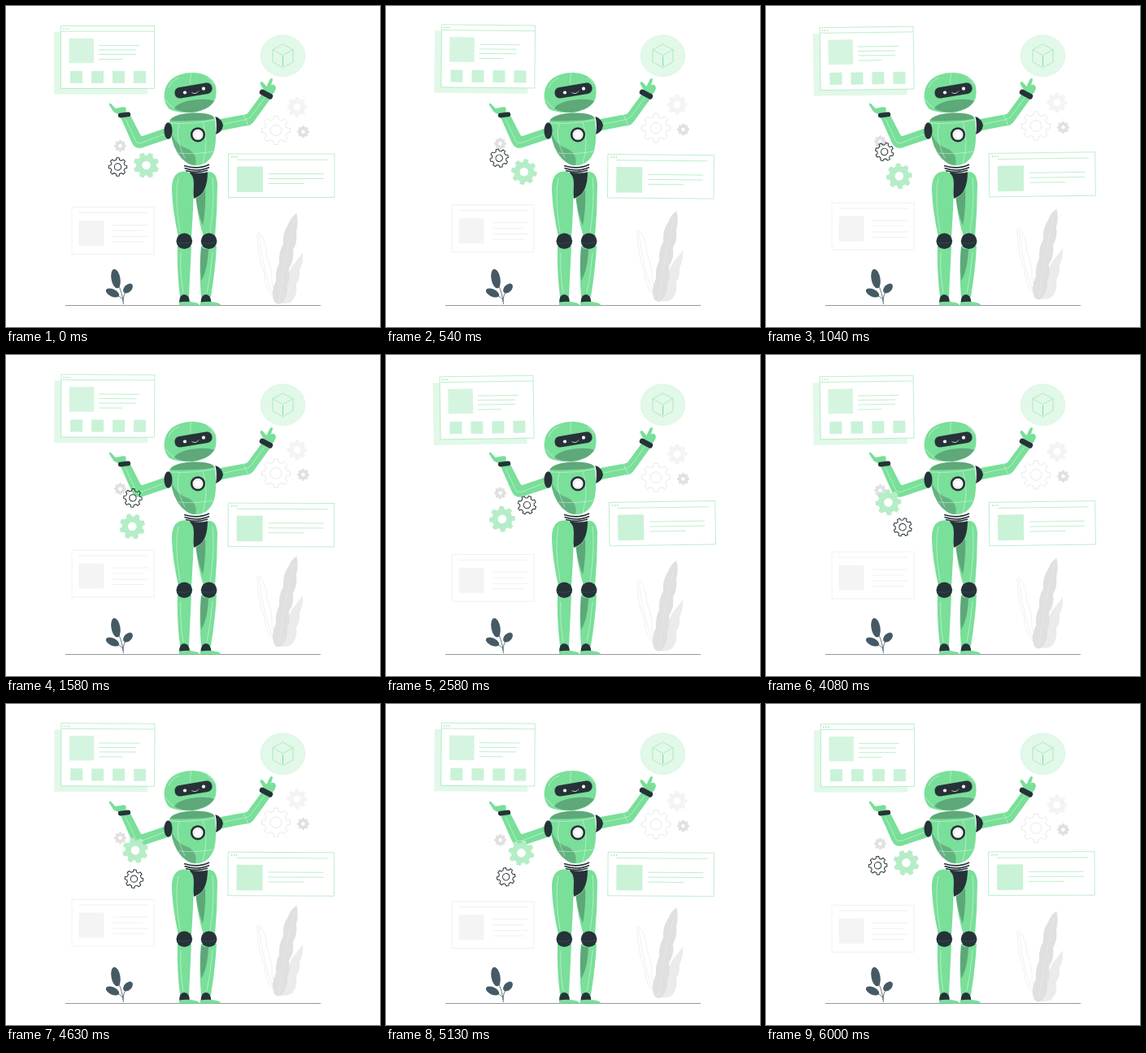
These frames come from a looping animation (460 by 395 pixels, 6040 ms). An HTML page:

```html
<!DOCTYPE html>
<html lang="en">
<head>
<meta charset="utf-8">
<title>Robot assistant</title>
<style>
html, body { margin: 0; width: 100%; height: 100%; overflow: hidden; background: #fff; }
svg { display: block; width: 460px; height: 395px; }
.g { fill: #79df99; }
.d { fill: #263238; }
.pale { fill: #c9f2d7; }
.shade { fill: #263238; opacity: .32; }
.line, .thin, .glint { fill: none; stroke-width: .5; }
.line { stroke: #79df99; }
.thin { stroke: #e0e0e0; }
.glint { stroke: #fff; stroke-width: .6; opacity: .7; }
</style>
</head>
<body>
<svg viewBox="0 0 460 395">
  <path d="M73 368.500H387" fill="none" stroke="#263238" stroke-width=".5"/>

  <g class="float">
    <path fill="#ebebeb" d="M338 366Q342 350 348 337Q347 328 352 320Q357 314 365 303.500Q366 315 361 325Q362 336 357 342Q359 355 352 363Q347 367 338 366"/>
    <path fill="#e0e0e0" d="M330 364Q325 352 332 338Q331 326 336 316Q335 303 341 293Q340 278 347 269Q350 260 357.500 255Q360 268 357 278Q359 290 353 300Q355 313 348 323Q350 335 346 344Q347 355 341 363Q336 370 330 364"/>
    <path class="thin" d="M330 359Q319 350 318 330Q310 312 309 282Q309 277 313 281Q320 290 321 308Q328 325 327 340Q331 350 330 359M311 282Q316 325 329 357"/>
    <path fill="none" stroke="#ededed" stroke-width=".5" d="M355 262Q342 310 336 364M363 309Q349 340 344 364"/>
    <path class="thin" d="M81 247.700H182V305.500H81ZM89 254.500H174M131 269.500H175M131 276.500H168M131 283.500H175M131 290H171"/>
    <path fill="#f4f4f4" d="M89.500 264h31v31h-31z"/>
  </g>

  <g fill="#455a64">
    <path fill="none" stroke="#455a64" stroke-width=".8" d="M144.500 367Q143 350 135 337M144 361Q138 355 130 353M144 364Q144 354 150 348"/>
    <ellipse cx="135" cy="335.500" rx="5.500" ry="12" transform="rotate(-10 135 335.500)"/>
    <ellipse cx="131" cy="353" rx="8.800" ry="4.600" transform="rotate(25 131 353)"/>
    <ellipse cx="150" cy="347.500" rx="7" ry="4.600" transform="rotate(-45 150 347.500)"/>
  </g>

  <g id="panels">
    <path fill="#e2f8e9" d="M59 32H174V108.500H59z"/>
    <path class="line" style="fill:#fff" d="M67.500 24.500H182.500V101.500H67.500z"/>
    <path class="line" d="M68 31.200H182M114 48.500H164M114 54H160M114 59.500H160M114 65.500H143"/>
    <path fill="#d5f5e0" d="M77.500 39.700h30.500v30.500h-30.500z"/>
    <path class="pale" d="M79 80h15v15h-15zM105 80h15v15h-15zM131 80h15v15h-15zM157 80h15v15h-15z"/>
    <path class="line" style="fill:#fff" d="M273.500 182H404V235.500H273.500z"/>
    <path class="line" d="M284 189.200H396M323 206.500H391M323 212.500H391M323 218.500H367"/>
    <path class="pale" d="M284 197.500h32v31.500h-32z"/>
    <path class="line" stroke-dasharray="1.400 1.600" style="stroke-width:1.200" d="M70.200 28H79M277.200 185.700H286"/>
  </g>

  <ellipse cx="340.500" cy="61.300" rx="27.300" ry="25.500" fill="#e2f8e9" stroke="#c9f2d7" stroke-width=".5"/>
  <path class="line" d="M340.500 47L353 53.700V68.800L340.500 75.800L328 68.800V53.700ZM328 53.700L340.500 60.800L353 53.700"/>
  <path class="line" style="stroke-width:1" d="M340.500 62V74"/>

  <g id="robot">
    <!-- arms -->
    <path class="g" d="M264 139L294 133.500Q296.500 133 298 131L315 108L326 113L305 142Q301 148 294 147.500L264 153.500z"/>
    <path class="g" d="M318.500 106L312.500 95.500Q313 91.500 316 94L320.500 99L324.500 90.500Q328 87.500 328 91L326 97.500Q331 95 332 101Q331 106 327 109z"/>
    <rect class="d" x="311.300" y="105.200" width="17.500" height="6.800" rx="3.200" transform="rotate(28 320 108.500)"/>
    <path class="g" d="M203 148L168 160Q166 160.500 165 158L153.500 135.500L141 137L154.500 167.500Q158.500 176.500 167 174.500L203 162.500z"/>
    <path class="g" d="M127 122Q126 118.500 129.500 120.500L134.500 126L143 124.500Q149 123.500 147.500 129L148 133H138Q132 131 131 128z"/>
    <rect class="d" x="137.800" y="131.200" width="15.400" height="5.700" rx="2.800" transform="rotate(-7 145.500 134)"/>
    <path class="glint" d="M268 145L294 140Q299 139 302 135L318 113M147 139L160 167Q163 170 168 168L194 158M292 134L298 147"/>

    <!-- legs -->
    <path class="d" d="M226 204Q238 207 249 204Q251 230 231 237z"/>
    <path class="g" d="M204 228Q203 205 218 203.500Q231 203 231 219L230 250Q229 270 228 284H212Q205 252 204 228"/>
    <path class="g" d="M248 204Q259 203 260 219Q260 252 257 284H243Q236 262 233.500 236.500Q248 230 248 204"/>
    <path class="shade" d="M233.500 236.500Q241 233 245 226Q246 250 242 270Q236 255 233.500 236.500"/>
    <path class="g" d="M211 295H228L225 358H214Q210 326 211 295M240 295H259Q258 320 252 358H240Q237 326 240 295"/>
    <path class="shade" d="M240 297Q245 300 249 299Q248 325 240 338Q238 316 240 297"/>
    <circle class="d" cx="219.300" cy="289.300" r="9.800"/>
    <circle class="d" cx="249.600" cy="289.300" r="9.800"/>
    <path fill="none" stroke="#455a64" stroke-width=".5" d="M211 291Q219 294 227 290M241 291Q250 294 258 290"/>
    <path class="d" d="M213 366Q213 355 219 355Q226 355 226 366zM239.500 366Q239.500 355 246 355Q252 355 252.500 366z"/>
    <path class="g" d="M213 364.500Q224 363 233 365Q238 366 238 368.500H213zM239 364.500Q250 363 259 365Q264 366 264 368.500H239z"/>
    <path class="glint" d="M212 211Q207 235 214 278M254 211Q257 240 251 279M215 303Q214 330 218 353M254 303Q252 330 247 353"/>

    <!-- torso -->
    <path fill="none" stroke="#263238" stroke-width="1.700" d="M219 196.500Q236 202 250 195M219.500 199.500Q236 205 250 198.500M221 202.500Q236 206.500 248 202"/>
    <path class="g" d="M201 142Q204 133 229 131.500Q255 131 257 139Q260 168 255 181Q250 192 241 195Q231 198 224 194Q209 184 204 164Q202 155 201 142"/>
    <path class="shade" style="opacity:.26" d="M203 153Q207 171 224 176Q236 183 233 196Q225 196 216 188Q204 174 203 153"/>
    <path class="shade" d="M201.500 141Q206 133 229 131.500Q253 131 256.500 138Q248 141 229 141Q211 142 201.500 141"/>
    <path class="glint" d="M201 144Q230 146 257 140M212 181Q232 183 255 179M242 143Q250 165 242 194M213 145Q207 162 220 187"/>
    <ellipse class="d" cx="199.500" cy="153.500" rx="5" ry="10.300"/>
    <path class="d" d="M257.500 136Q266 139 267 147Q266 155 258 158Q260 147 257.500 136"/>
    <circle cx="236" cy="158.300" r="7.800" fill="#fff" stroke="#263238" stroke-width="2.600"/>
    <circle cx="236" cy="158.300" r="4.800" fill="#fff" stroke="#c7c7c7" stroke-width=".6"/>

    <!-- head -->
    <path class="g" d="M194.500 111Q195 91 214 84.500Q232 79 247 86Q258 92 258.500 103Q259 114 255 119Q247 129 230 131Q210 132 201 127Q195 121 194.500 111"/>
    <path class="shade" d="M207 126Q212 118 231 115.500Q248 113.500 256 117Q250 127 231 130.500Q216 132 207 126"/>
    <path class="glint" d="M228 82.500Q226 89 227 96M200 101Q203 92 213 88M196 115Q201 122 207 126M248 88Q253 91 255 96"/>
    <rect class="d" x="207.300" y="97.300" width="46.500" height="13.500" rx="6.200" transform="rotate(-9.500 230.500 104)"/>
    <circle cx="220" cy="106.500" r="2.100" fill="#fff"/>
    <circle cx="243" cy="101.700" r="2.100" fill="#fff"/>
    <path fill="none" stroke="#fff" stroke-width=".7" d="M228.500 106.500Q233.500 109.500 237 104.500"/>
  </g>

  <g class="float" id="greys"></g>
  <g id="orbit"></g>
</svg>
<script>
const $ = id => document.getElementById(id);
const LOOP = 6040;

// Toothed wheel with a round hole, centred on x, y; turn is in teeth
function gear(parent, x, y, r, hole, style, turn = 0) {
  const teeth = 8, inner = r * .78, step = 2 * Math.PI / teeth, pts = [];
  for (let i = 0; i < teeth; i++) {
    for (const [k, rad] of [[-.31, inner], [-.18, r], [.18, r], [.31, inner]]) {
      const a = (i + k + turn) * step;
      pts.push((x + rad * Math.cos(a)).toFixed(2) + ' ' + (y + rad * Math.sin(a)).toFixed(2));
    }
  }
  const ring = `M${x - hole} ${y}a${hole} ${hole} 0 1 0 ${2 * hole} 0a${hole} ${hole} 0 1 0 ${-2 * hole} 0z`;
  parent.insertAdjacentHTML('beforeend',
    `<path d="M${pts.join('L')}Z${ring}" fill-rule="evenodd" stroke-linejoin="round" ${style}/>`);
}

const solid = c => `fill="${c}" stroke="${c}"`;
const outline = (c, w) => `fill="none" stroke="${c}" stroke-width="${w}"`;

gear($('greys'), 358, 124.3, 12, 5, solid('#f4f4f4'));
gear($('greys'), 332, 153, 17.7, 6.8, outline('#e0e0e0', .7));
gear($('greys'), 365.5, 154.8, 7, 2.8, solid('#e0e0e0'));
gear($('greys'), 140.5, 172.2, 7, 2.8, solid('#e0e0e0'));
gear($('orbit'), 172.5, 196, 15.4, 5.8, solid('#b5edc6'), .5);
gear($('orbit'), 137.5, 198, 11.3, 4.2, outline('#263238', 1));

// Triangle wave: 0, 1, 0, -1, 0 over p = 0..1
const sway = p => p < .25 ? 4 * p : p < .75 ? 2 - 4 * p : 4 * p - 4;
const floats = document.querySelectorAll('.float');

function draw(now) {
  const u = now % LOOP / LOOP;
  const lift = 7.9 * (1 - Math.abs(1 - 2 * (u * 2 % 1)));
  floats.forEach(el => el.setAttribute('transform', `translate(0 ${-lift})`));
  $('panels').setAttribute('transform', `rotate(${sway(u * 4 % 1)} 231.5 130)`);
  $('orbit').setAttribute('transform', `rotate(${u * 360} 157 195.5)`);
  requestAnimationFrame(draw);
}
draw(performance.now());
</script>
</body>
</html>
```
